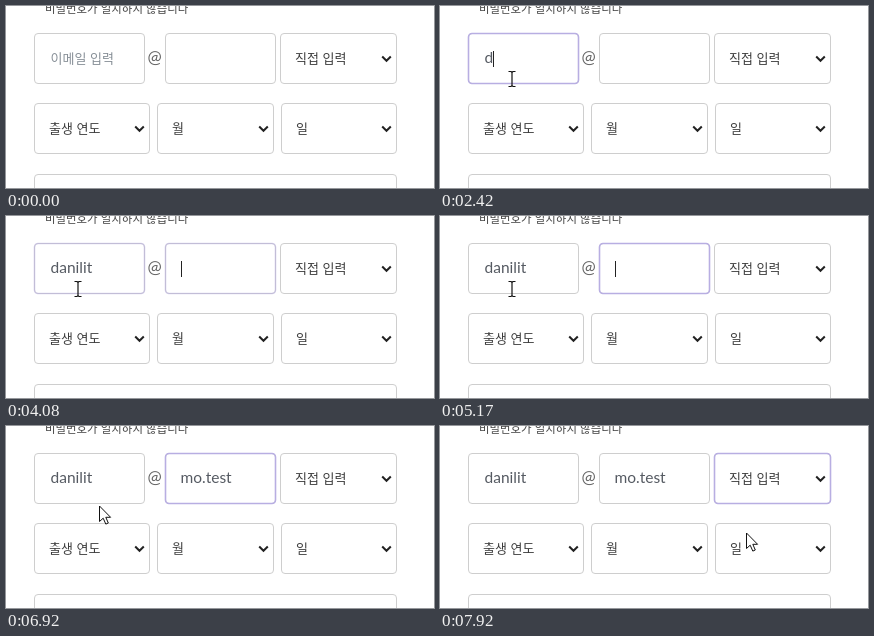
An HTML page for the animation above (8 s loop, 428 by 182 pixels).

```html
<!DOCTYPE html>
<html lang="ko">
<head>
<meta charset="utf-8">
<title>회원 정보 입력</title>
<style>
  html, body { margin: 0; width: 100%; height: 100%; overflow: hidden; background: #fff; }
  svg { display: block; width: 428px; height: 182px; }
  text { font: 13px "Noto Sans CJK KR", "Noto Sans CJK JP", "Noto Sans CJK", sans-serif; fill: #3c3c3c; white-space: pre; }
  .notice { font-size: 11.45px; fill: #444; }
  .hint { fill: #868e96; }
  .typed { font: 15.5px Lato, sans-serif; fill: #555a62; }
  .at { font: 17px Lato, sans-serif; fill: #666; }
  .field { fill: #fff; stroke: #cecece; }
  .ring { fill: none; stroke: #b8aee2; stroke-width: 1.6; opacity: 0; }
  .chevron { fill: none; stroke: #222; stroke-width: 2; }
  .caret { fill: #222; }
</style>
</head>
<body>
<svg viewBox="0 0 428 182">
  <text class="notice" x="39" y="6.6">비밀번호가 일치하지 않습니다</text>
  <g id="form"></g>
  <text class="at" x="148.5" y="57.4" text-anchor="middle">@</text>
  <text class="hint" id="hint" x="44.5" y="57">이메일 입력</text>
  <text class="typed" id="email" x="44.5" y="57.2"></text>
  <text class="typed" id="domain" x="174.5" y="57.2"></text>
  <rect class="caret" id="caret" y="45" width="1" height="16"/>
  <g id="pointer">
    <path id="arrow" d="M.5 0V15.5L4.2 12.2L6.8 18.1L9.3 17L6.8 11.3H11.6Z" fill="#fff" stroke="#111"/>
    <path id="beam" d="M-3.5-7.5H-1L0-6.5L1-7.5H3.5M0-6.5V6.5M-3.5 7.5H-1L0 6.5L1 7.5H3.5" fill="none" stroke="#111" stroke-width="1.2"/>
  </g>
</svg>
<script>
const FPS = 12, TICKS = 96;
const $ = id => document.getElementById(id);
const form = $('form'), hint = $('hint'), caret = $('caret');

function add(tag, attrs, label = '') {
  const el = document.createElementNS('http://www.w3.org/2000/svg', tag);
  for (const key in attrs) el.setAttribute(key, attrs[key]);
  el.textContent = label;
  return form.appendChild(el);
}

function field(x, y, w, label) {
  const box = { x: x + .5, y: y + .5, width: w, height: 50, rx: 3.5 };
  add('rect', { ...box, class: 'field' });
  if (label) {
    add('text', { x: x + 15, y: y + 30 }, label);
    add('path', { class: 'chevron', d: `M${x + w - 13.8} ${y + 23.5}l4.3 4.3l4.3-4.3` });
  }
  return add('rect', { ...box, class: 'ring' });
}

// Each stop: [tick, x, y]
const path = [
  [12, 2, 100], [13, 14, 96], [15, 45, 84], [17, 68, 75], [19, 72, 73], [82, 72, 73],
  [83, 93, 80], [84, 186, 82], [85, 186, 82], [86, 232, 72], [87, 268, 60], [88, 290, 50],
  [89, 297, 49], [91, 297, 49], [92, 298, 60], [93, 302, 85], [94, 308, 111], [95, 306, 107]
];

const inputs = [
  { text: $('email'), value: 'danilit', keys: [29, 31, 35, 37, 38, 39, 44], from: 20, to: 49, off: [26, 29] },
  { text: $('domain'), value: 'mo.test', keys: [64, 66, 69, 71, 72, 74, 75], from: 49, to: 89, off: [55, 62, 80, 86] }
];
inputs[0].ring = field(28, 27, 110);
inputs[1].ring = field(159, 27, 110);
const select = { ring: field(274, 27, 116, '직접 입력'), from: 89, to: TICKS };
field(28, 97, 115, '출생 연도');
field(151, 97, 116, '월');
field(275, 97, 115, '일');
field(28, 168, 362);

const within = (v, a, b) => v >= a && v < b;

function locate(tick) {
  const i = path.findIndex(p => p[0] >= tick);
  const b = path[i], a = path[Math.max(0, i - 1)];
  const k = b === a ? 0 : (tick - a[0]) / (b[0] - a[0]);
  return [1, 2].map(n => Math.round(a[n] + (b[n] - a[n]) * k));
}

function drawPointer(tick) {
  const shown = tick >= path[0][0];
  $('pointer').style.display = shown ? '' : 'none';
  if (!shown) return;
  const [x, y] = locate(tick);
  const overText = within(y, 27, 78) && (within(x, 28, 139) || within(x, 159, 270));
  $('pointer').setAttribute('transform', `translate(${x} ${y})`);
  $('arrow').style.display = overText ? 'none' : '';
  $('beam').style.display = overText ? '' : 'none';
}

function drawRing({ ring, from, to }, tick) {
  const fadeIn = Math.min(1, Math.max(0, (tick - from + 1) / 2));
  const fadeOut = Math.min(1, Math.max(0, (tick - to + 1) / 2));
  ring.style.opacity = tick < to ? fadeIn : 1 - fadeOut;
}

function draw(tick) {
  caret.style.display = 'none';
  for (const input of inputs) {
    const { text, value, keys, from, to, off } = input;
    text.textContent = value.slice(0, keys.filter(k => k <= tick).length);
    drawRing(input, tick);
    const blinkedOff = off.filter(k => k <= tick).length % 2;
    if (within(tick, from, to) && !blinkedOff) {
      const width = text.textContent ? text.getComputedTextLength() : 0;
      caret.setAttribute('x', Math.round(+text.getAttribute('x') + width));
      caret.style.display = '';
    }
  }
  drawRing(select, tick);
  hint.style.display = tick < inputs[0].keys[0] ? '' : 'none';
  drawPointer(tick);
}

let last = -1;
const start = performance.now();
function loop(now) {
  const time = Math.max(0, now - start);
  const tick = Math.floor(time * FPS / 1000 + .08) % TICKS;
  if (tick !== last) draw(last = tick);
  requestAnimationFrame(loop);
}
loop(start);
</script>
</body>
</html>
```
